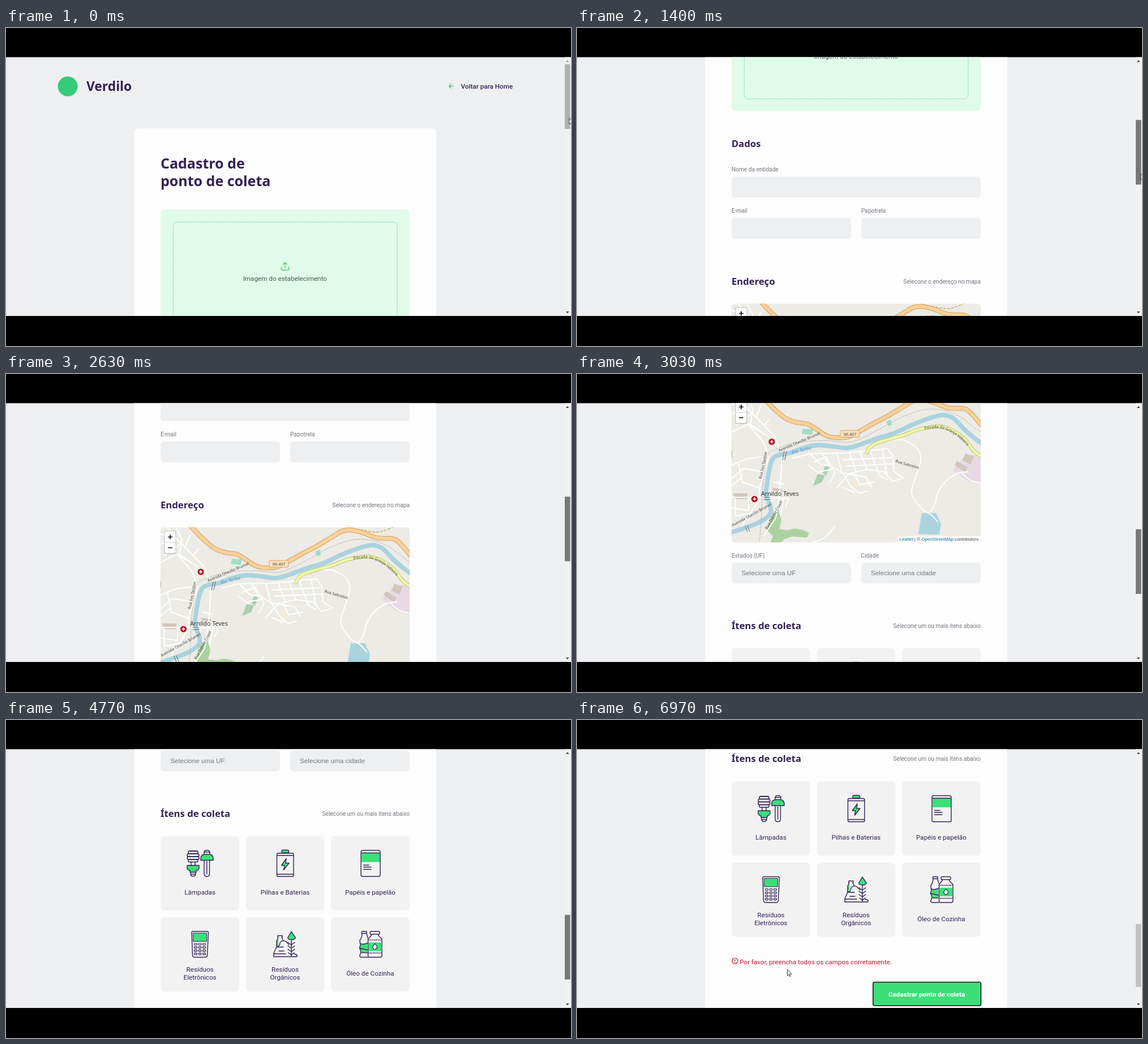
Animation of 998 by 561 pixels, one loop 7010 ms. Source, as an HTML page:

```html
<!DOCTYPE html>
<html lang="pt">
<head>
<meta charset="utf-8">
<title>Cadastro de ponto de coleta</title>
<style>
html, body { margin: 0; width: 100%; height: 100%; overflow: hidden; background: #000; }
svg { display: block; width: 100%; height: 100%; }
text { font: 11.7px Roboto, sans-serif; fill: #322153; }
.h1 { font: 700 25px "Noto Sans", sans-serif; }
.h2 { font: 700 16.7px "Noto Sans", sans-serif; }
.label { font-size: 10.2px; fill: #74747f; }
.select { font: 11.7px "Liberation Sans", Arial, sans-serif; fill: #777781; }
.end { text-anchor: end; }
.mid { text-anchor: middle; }
.input rect { fill: #eeeff1; }
.items rect { fill: #f2f2f2; }
.line { fill: none; stroke-linecap: round; stroke-linejoin: round; }
.streets { stroke: #fff; stroke-width: 2; }
.map text { font: 7px "Noto Sans", sans-serif; fill: #444; }
.icon { fill: none; stroke: #322153; stroke-width: 1.4; stroke-linejoin: round; stroke-linecap: round; }
.g { fill: #3be078; }
</style>
</head>
<body>
<svg viewBox="0 0 998 561" preserveAspectRatio="none">
<defs>
  <clipPath id="view"><rect y="51.5" width="998" height="456.5"/></clipPath>
  <clipPath id="mapClip"><rect x="273" y="270.5" width="440" height="256" rx="6"/></clipPath>
  <path id="highway" data-p="322,264 345,288 367,307 388,315 410,319 440,338 462,342 480,340 500,330 525,316 550,303 575,288 592,278 608,275 630,280 655,289 685,291 699,302 718,324"/>
  <path id="lane" data-p="512,368 518,358 530,351 553,344 575,338 605,327 640,322 665,330 686,346 702,366 720,378"/>
</defs>
<g clip-path="url(#view)">
  <rect width="998" height="561" fill="#eeeff1"/>
  <g id="page">
    <circle cx="109" cy="103" r="17.5" fill="#34cb79"/>
    <text class="h1" x="142" y="111" style="font-size:22.8px">Verdilo</text>
    <path class="line" d="M790 102.5H782.5M786 99L782.5 102.5L786 106" stroke="#34cb79" stroke-width="1.3"/>
    <text x="803.5" y="107" style="font-weight:500">Voltar para Home</text>

    <rect id="card" x="226.5" y="177" width="533.5" height="1535" rx="6" fill="#fdfdfd"/>
    <text class="h1" x="273" y="248">Cadastro de</text>
    <text class="h1" x="273" y="279">ponto de coleta</text>

    <rect x="273" y="320" width="440" height="218.5" rx="7" fill="#e0fbe9"/>
    <rect x="295.5" y="342.5" width="395.5" height="174.5" rx="7" fill="none" stroke="#74d69a" stroke-dasharray="2.5 1.5"/>
    <path class="line" d="M493 423V413.5M489.5 417L493 413.5L496.5 417M486.5 421.5V425.5Q486.5 427 488 427H498Q499.5 427 499.5 425.5V421.5" stroke="#4ecb79" stroke-width="1.5"/>
    <text class="mid" x="492.8" y="446" style="fill:#3f5a4c">Imagem do estabelecimento</text>

    <text class="h2" x="273" y="602">Dados</text>
    <text class="label" x="273" y="645">Nome da entidade</text>
    <text class="label" x="273" y="718">E-mail</text>
    <text class="label" x="502" y="718">Papotrela</text>
    <g class="input">
      <rect x="273" y="654" width="440" height="37" rx="6"/>
      <rect x="273" y="727" width="211" height="37" rx="6"/>
      <rect x="502" y="727" width="211" height="37" rx="6"/>
      <rect x="273" y="1170.5" width="211" height="36.5" rx="6"/>
      <rect x="502" y="1170.5" width="211" height="36.5" rx="6"/>
    </g>
    <text class="h2" x="273" y="845">Endereço</text>
    <text class="label end" x="713" y="842.5">Selecone o endereço no mapa</text>

    <g transform="translate(0 608)"><g class="map" clip-path="url(#mapClip)">
      <rect x="273" y="270" width="440" height="257" fill="#ecebe6"/>
      <path fill="#e8d9e5" d="M664 399L684 374L700 371L714 376V425L690 418Z"/>
      <path fill="#d2c6bd" d="M681 382L686 370L701 375L695 389ZM667 390L671 383L690 394L686 403ZM275 440H301V450H280ZM344 430L362 432V437L346 435Z"/>
      <path fill="#aad3df" d="M609 475H634L643 494L640 513L603 512Z"/>
      <path fill="#aacfaf" d="M417 427L425 406L438 408L433 420ZM434 404L438 392L445 394L440 409Z"/>
      <path fill="#9fe0c5" d="M399 326L417 327L415 337L397 335ZM546 313L555 310L556 320L549 321Z"/>
      <path fill="#cde2ae" d="M500 327L522 315L525 320L505 330Z"/>
      <path fill="#add19e" d="M343 480L356 470L361 488L357 503L372 505L385 502L400 505L410 510L406 518L392 517L380 516L366 521L360 527H342L346 515L335 505Z"/>
      <circle cx="491" cy="423" r="6" fill="#f3eecb"/>
      <g class="line streets">
        <path d="M273 282L300 290L322 311L349 339L357 360M273 300L290 292M281 319L310 298M300 270L311 292L306 318L327 332M273 332L302 318L340 341M284 270L296 283M325 285L316 306M340 309L330 320M302 318L330 350L337 372"/>
        <path d="M273 390L300 379L338 374L331 403L322 430L323 447L300 487M273 414L294 396L328 402M285 386L292 420L323 431M273 427L290 413M273 447H323L374 449M303 450V470L273 466M280 450V480L314 474M290 502L301 478M362 376L360 410L357 449L351 484L330 515M348 420L365 424M365 449L360 478M374 449L369 463M344 450L340 466"/>
        <path d="M380 378L412 370L470 369L512 365L548 361L558 374L560 402L577 413L557 419L543 402L512 398L481 405L459 430M412 370L430 389L448 391L470 405L483 427L498 440L513 436M418 385L440 376L456 404L446 422M426 402L450 398M432 368L445 390M459 369L468 404M481 368L493 402M500 367L512 398M518 365L534 408L548 416M539 363L547 405M470 381L555 377M474 392L558 388M468 404L510 411L520 428M490 405L499 425L524 420M409 391L428 405M470 430L490 438"/>
        <path data-p="555,345 580,347 602,362 607,382 597,415 591,438 601,458 620,474 632,459 637,440 650,420 672,405 690,402"/>
        <path data-p="620,474 628,480 637,490"/>
        <path data-p="413,527 438,518 455,499"/>
        <path data-p="678,403 695,417 718,423"/>
      </g>
      <path class="line" stroke="#aad3df" stroke-width="8" data-p="266,511 285,505 305,498 324,490 340,478 342,465 334,442 336,420 341,392 350,375 375,369 400,360 425,355 450,357 478,360 500,354 530,343 560,334 590,320 618,309 645,302 664,307 685,328 700,341 720,356"/>
      <path class="line" stroke="#b2b2b2" stroke-dasharray="3 2" data-p="322,527 326,480 327,440 331,405 337,372 354,361 390,350 440,347 485,349 530,329 570,307 610,293 645,293 675,304 698,321 720,337"/>
      <path class="line" stroke="#c0a64c" stroke-width="1.2" stroke-dasharray="4 3" data-p="606,271 633,276 658,279 684,270"/>
      <path class="line" stroke="#666" d="M363 381L366 366M367 381L370 366M330 447H340M330 451H340M297 498L301 508M301 497L305 507M273 366V376"/>
      <g class="line">
        <use href="#lane" stroke="#b5c06c" stroke-width="6.4"/><use href="#lane" stroke="#f0f7a8" stroke-width="4.6"/>
        <use href="#highway" stroke="#d9a15f" stroke-width="8.4"/><use href="#highway" stroke="#f7d19b" stroke-width="6.2"/>
      </g>
      <rect x="465" y="329" width="34" height="12" rx="2" fill="#f9dfbb" stroke="#d9a56a"/>
      <text class="mid" x="482" y="338">XK-407</text>
      <text transform="translate(357 367) rotate(-23)">Avenida Otacilio Brumel</text>
      <text transform="translate(275 499) rotate(-29)">Avenida Otacilio Brumel</text>
      <text transform="translate(326 415) rotate(-78)">Rua Ivo Tardim</text>
      <text transform="translate(336 504) rotate(-61)">Rua Danilo Cravil</text>
      <text transform="translate(562 385) rotate(17)">Rua Sabrelim</text>
      <path id="laneText" fill="none" data-p="614,327 640,325 662,333 680,347 700,366"/>
      <text><textPath href="#laneText">Estrada da Granja Vidreira</textPath></text>
      <text transform="translate(380 371) rotate(-14)" style="font-size:8.5px;font-style:italic;fill:#5599bd">Rio Tarbo</text>
      <text x="325" y="444" style="font-size:10.7px;fill:#333">Arnildo Teves</text>
      <g fill="#b0101c"><circle cx="344" cy="349" r="5.5"/><circle cx="313.5" cy="450" r="5.5"/></g>
      <path d="M341 349H347M344 346V352M310.5 450H316.5M313.5 447V453" stroke="#fff" stroke-width="1.6"/>
      <rect x="279.5" y="276.5" width="21" height="41" rx="3" fill="#0003"/>
      <rect x="280.5" y="277.5" width="19" height="38.5" rx="2" fill="#fff"/>
      <path d="M280.5 297H299.5" stroke="#ccc"/>
      <path d="M286 287.5H294M290 283.5V291.5M286 306.5H294" stroke="#111" stroke-width="1.7"/>
      <rect x="565.5" y="515" width="148" height="12" fill="#fffb"/>
      <text class="end" x="709" y="523.5" style="font:8.03px 'Liberation Sans',Arial,sans-serif"><tspan fill="#0078a8">Leaflet</tspan> | © <tspan fill="#0078a8">OpenStreetMap</tspan> contributors</text>
    </g></g>

    <text class="label" x="273" y="1161.5">Estados (UF)</text>
    <text class="label" x="501.5" y="1161.5">Cidade</text>
    <text class="select" x="290.5" y="1192.3">Selecione uma UF</text>
    <text class="select" x="519" y="1192.3">Selecione uma cidade</text>

    <text class="h2" x="273" y="1287">Ítens de coleta</text>
    <text class="label end" x="713" y="1285">Selecone um ou mais itens abaixo</text>

    <g transform="translate(0 1213)">
      <g class="items" id="items"></g>
      <g class="icon">
        <!-- lamps -->
        <path d="M324 135H338"/>
        <rect x="322" y="134.5" width="17" height="5" rx="2.5"/><rect x="320" y="139.5" width="21" height="5" rx="2.5"/>
        <rect x="320" y="144.5" width="21" height="5" rx="2.5"/><rect x="322" y="149.5" width="17" height="4.5" rx="2"/>
        <path d="M327 154V160M334 154V160M326 172V176L328 179H333L335 176V172M326 175.5H335"/>
        <path class="g" d="M320 160H341V164Q341 168 336 169V172H325V169Q320 168 320 164Z"/>
        <path d="M350 140V136L352 133.5H358L360 136V140M350 136.5H360M350 151V175Q350 179.5 354.7 179.5T359.5 175V151M354.7 153V175"/>
        <path class="g" d="M344 151V148Q344 141 351 140.5H359Q366 141 366 148V151Z"/>
        <!-- battery -->
        <path class="g" d="M487 138V135Q487 133 489 133H497Q499.5 133 499.5 135V138Z"/>
        <rect x="478.5" y="138.5" width="29.5" height="41" rx="2.5"/>
        <path d="M479 142.5H507.5M479 175.5H507.5"/>
        <path class="g" d="M495 148L486.5 160H492L490.5 168L500 156H494Z"/>
        <!-- paper -->
        <path class="g" stroke="none" d="M628 138H661V154H628Z"/>
        <rect x="627" y="133.5" width="34" height="46" rx="3"/>
        <path d="M628 138H660M631.5 159.5H641M631.5 163H645M631.5 167H645"/>
        <!-- card reader -->
        <path d="M330 276.5H355Q357.5 276.5 357.5 279L355.5 319Q355 322 352 322H333Q330 322 329.5 319L328 279Q328 276.5 330 276.5Z"/>
        <path class="g" stroke-width="1" d="M331 279.5H354.5V294H331Z"/>
        <g id="keys" stroke-width="1.2"></g>
        <!-- organic waste -->
        <path class="g" stroke="none" d="M478 294L481 289V301L477 306Z"/>
        <path d="M480 287V284H488V287M481 287L478 293V304L473 315V321H514V318L509 316M487 287L490 293M478 304Q484 303 484 296Q489 291 494 294L500 300M478 304H490M482 311H491M474 316H494"/>
        <path class="g" d="M504 277L498 287Q497 291 504 291T511 287Z"/>
        <path d="M504 291V320M498 296L504 300L510 296M498 302L504 306L510 302M498 308L504 312L510 308M499 314L504 318L509 314"/>
        <!-- oil -->
        <path class="g" stroke="none" d="M625 296Q630 301 638 298V313H627L625 306Z"/>
        <path d="M628.5 276.5H637V280H628.5ZM629 280Q629 287 625 292L626 301L624.5 305L627 313L624.5 320L627 322H639M637 280L639 288M625 297Q630 301 638 297M625 306L638 309M628 314H638"/>
        <rect x="643" y="276.5" width="17" height="5" rx="1.5"/>
        <path d="M645 281.5V284L639.5 290V319Q639.5 322 642.5 322H661Q664 322 664 319V290L658 284V281.5"/>
        <path class="g" stroke="none" d="M640.3 296H663.3V311H640.3Z"/>
        <path d="M640 291.5H663.5M640 314.5H663.5" stroke-width="1"/>
        <path fill="#f6f6f6" stroke-width="1.2" d="M651.5 298L648 303Q647.5 308 651.5 308T655.5 303Z"/>
      </g>
    </g>

    <g id="error">
      <g fill="none" stroke="#c8102e" stroke-width="1.2"><circle cx="279" cy="1638" r="5"/><path d="M279 1635V1638.7M279 1640V1641.2"/></g>
      <text x="287.3" y="1643.5" style="fill:#cc1330">Por favor, preencha todos os campos corretamente.</text>
    </g>
    <g id="button">
      <rect x="523" y="1624.5" width="190.5" height="41.5" rx="3"/>
      <text class="mid" x="617.7" y="1650" style="font-weight:700;fill:#fff">Cadastrar ponto de coleta</text>
    </g>
  </g>

  <rect x="987" y="51" width="11" height="457" fill="#f1f1f1"/>
  <rect id="thumb" x="987" width="9.5"/>
  <path id="up" d="M988.7 60H994.7L991.7 56.5Z"/>
  <path d="M988.7 500H994.7L991.7 503.5Z" fill="#505050"/>
  <g fill="#fff" stroke="#111" stroke-width=".8" stroke-linejoin="round">
    <path id="arrow" d="M0 0V11L2.5 8.7L4.2 12.5L5.7 11.8L4.1 8.2H7.5Z"/>
    <path id="hand" d="M-1 8V1Q0-1 1.2 1V5L5.5 6Q7 6.5 6.8 9L5.5 14.5H-.5L-4 9.5Q-4.5 7.5-2.5 8Z"/>
  </g>
</g>
</svg>
<script>
const $ = id => document.getElementById(id);
const set = (el, attrs) => { for (const k in attrs) el.setAttribute(k, attrs[k]); };

// Smooth curve through the given points
function curve(p) {
  let d = `M${p[0]}`;
  for (let i = 0; i < p.length - 1; i++) {
    const a = p[i - 1] || p[i], b = p[i], c = p[i + 1], e = p[i + 2] || c;
    const c1 = b.map((v, k) => v + (c[k] - a[k]) / 6);
    const c2 = c.map((v, k) => v - (e[k] - b[k]) / 6);
    d += `C${c1} ${c2} ${c}`;
  }
  return d;
}
document.querySelectorAll('[data-p]').forEach(el =>
  el.setAttribute('d', curve(el.dataset.p.split(' ').map(s => s.split(',').map(Number)))));

const items = ['Lâmpadas', 'Pilhas e Baterias', 'Papéis e papelão', 'Resíduos/Eletrônicos', 'Resíduos/Orgânicos', 'Óleo de Cozinha'];
$('items').innerHTML = items.map((name, i) => {
  const x = 273.3 + i % 3 * 150.4, y = 108.3 + (i > 2) * 143.2, lines = name.split('/');
  return `<rect x="${x}" y="${y}" width="138.7" height="131" rx="6"/>` + lines.map((s, k) =>
    `<text class="mid" x="${x + 69.3}" y="${y + 103 + (k - (lines.length - 1) / 2) * 14}">${s}</text>`).join('');
}).join('');
$('keys').innerHTML = Array.from({ length: 12 }, (_, i) =>
  `<rect x="${332.5 + i % 3 * 7.5}" y="${297.5 + (i / 3 | 0) * 5.7}" width="5" height="3" rx="1.3"/>`).join('');

const LOOP = 7010, DROP = 4990, PRESS = 5670, FAIL = 5730;
const scrollKeys = [[30, 0], [670, 200], [900, 200], [1400, 392], [1530, 425], [1870, 425], [2570, 608], [2630, 608],
  [3030, 837.5], [3330, 940], [3370, 940], [3800, 1035], [4200, 1035], [4570, 1116.5], [4770, 1116.5], [DROP, 1213]];
const xKeys = [[670, 995], [1400, 996], [1870, 1000], [DROP, 1000], [5230, 662], [5800, 662], [6900, 371.5]];
const yKeys = [[DROP, 463], [5230, 437], [5800, 437], [6900, 440]];

function at(keys, t) {
  const i = keys.findIndex(k => k[0] > t);
  if (i < 1) return keys[i < 0 ? keys.length - 1 : 0][1];
  const [t0, a] = keys[i - 1], [t1, b] = keys[i];
  return a + (b - a) * (t - t0) / (t1 - t0);
}

function draw(now) {
  const t = now % LOOP, failed = t >= FAIL, grow = failed ? 51 : 0;
  const scroll = at(scrollKeys, t);
  const thumbY = 64 + scroll / (failed ? 4.098 : 3.99);
  const x = at(xKeys, t), y = t < DROP ? thumbY + 95 : at(yKeys, t);
  const over = !failed && t > DROP && x < 714;

  set($('page'), { transform: `translate(0 ${-scroll})` });
  set($('card'), { height: 1535 + grow });
  set($('error'), { visibility: failed ? 'visible' : 'hidden' });
  set($('button'), { transform: `translate(0 ${grow})` });
  set($('button').firstElementChild, {
    fill: over ? '#34c76f' : '#3be078', stroke: t >= PRESS ? '#111' : 'none', 'stroke-width': 1.6
  });
  set($('thumb'), { y: thumbY, height: failed ? 111 : 114, fill: t < 30 ? '#b0b0b0' : t < DROP ? '#787878' : '#c1c1c1' });
  set($('up'), { fill: scroll ? '#505050' : '#a3a3a3' });
  set($('arrow'), { transform: `translate(${x} ${y})`, visibility: over ? 'hidden' : 'visible' });
  set($('hand'), { transform: `translate(${x} ${y})`, visibility: over ? 'visible' : 'hidden' });
}

let start;
function tick(now) {
  start ??= now;
  draw(now - start);
  requestAnimationFrame(tick);
}
draw(0);
requestAnimationFrame(tick);
</script>
</body>
</html>
```
